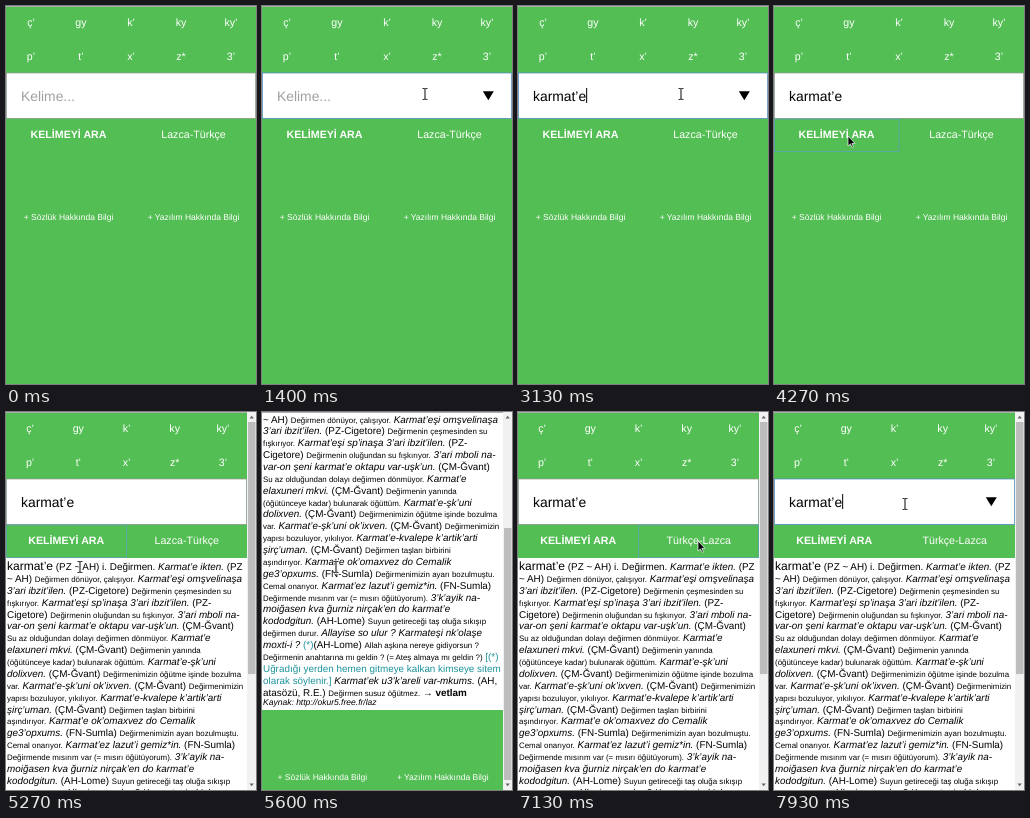
Animation, 250 px wide and 378 px high, one loop 8 s. Source, as an HTML page:

```html
<!DOCTYPE html>
<html lang="tr">
<head>
<meta charset="utf-8">
<title>Lazca sözlük</title>
<style>
html, body { margin: 0; width: 100%; height: 100%; overflow: hidden; background: #53be53; }
svg { display: block; width: 100%; height: 100%; }
text { font-family: "Liberation Sans", Arial, sans-serif; font-size: 10.67px; fill: #fff; text-rendering: geometricPrecision; white-space: pre; }
.mid { text-anchor: middle; }
.link { font-size: 8.53px; }
.strong { font-weight: bold; }
#value { font-size: 13.87px; }
#results text { font-size: 9.9px; fill: #000; }
#results .small { font-size: 7.92px; }
#results .head { font-size: 12px; }
#results .source { font-size: 8.53px; font-style: italic; }
.ital { font-style: italic; }
.note { fill: #1c929c; }
#list text { font-family: "DejaVu Sans", sans-serif; font-size: 8.53px; fill: #000; }
</style>
</head>
<body>
<svg id="stage" viewBox="0 0 250 378" preserveAspectRatio="none">
  <rect width="250" height="378" fill="#53be53"/>
  <g id="page">
    <g id="keys"></g>
    <rect id="field" x=".33" y="67" height="45.33" fill="#fff" stroke-width=".67"/>
    <text id="value" x="15" y="94.5"></text>
    <rect id="caret" y="82" width="1" height="15"/>
    <path id="drop" d="M-5.5-4.5h11L0 4.5z"/>
    <rect id="focus" y="113" height="32.67" fill="none" stroke="#5b9fc4" stroke-width=".67"/>
    <text id="search" class="mid strong" y="132.4">KELİMEYİ ARA</text>
    <text id="mode" class="mid" y="132.4"></text>
    <g id="results"><rect y="146" width="241" height="311.5" fill="#fff"/></g>
    <text id="about" class="mid link">+ Sözlük Hakkında Bilgi</text>
    <text id="soft" class="mid link">+ Yazılım Hakkında Bilgi</text>
    <g id="list"></g>
  </g>
  <rect width="250" height="1" fill="#aab0aa"/>
  <g id="bar">
    <rect x="241" width="9" height="378" fill="#f1f1f1"/>
    <rect id="thumb" x="242" width="7.5" height="252" fill="#bdbdbd"/>
    <path d="M243.5 6.5l2.2-2.8 2.2 2.8zM243.5 371.5l2.2 2.8 2.2-2.8z" fill="#666"/>
  </g>
  <g id="pointer">
    <g id="beam" fill="none">
      <g stroke="#fff" stroke-width="2.4">
        <path id="beamLine" d="M-2.5-5.5H-1L0-4.7 1-5.5H2.5M0-4.7V4.7M-2.5 5.5H-1L0 4.7 1 5.5H2.5"/>
      </g>
      <use href="#beamLine" stroke="#333" stroke-width="1.2"/>
    </g>
    <path id="arrow" d="M0 0V10L2.4 7.9 4 11.4 5.4 10.8 3.9 7.4H7Z" stroke="#fff" stroke-width=".7"/>
  </g>
</svg>
<script>
const LOOP = 8000, BAR = 9, MAX_SCROLL = 159.5, ROW = 15.8;
const FOCUS = 670, PICK = 2800, SEARCH = 4270, SHOW = 4330, SWAP = 7000, REFOCUS = 7650;
const $ = id => document.getElementById(id);

function add(parent, tag, attrs, html = '') {
  const el = document.createElementNS('http://www.w3.org/2000/svg', tag);
  set(el, attrs);
  el.innerHTML = html;
  parent.append(el);
  return el;
}
function set(el, attrs) {
  for (const k in attrs) el.setAttribute(k, attrs[k]);
}
function show(el, on) {
  el.style.display = on ? '' : 'none';
}

const keys = ['ç’', 'gy', 'k’', 'ky', 'ky’', 'p’', 't’', 'x’', 'z*', '3’'].map((s, i) =>
  add($('keys'), 'text', { class: 'mid', y: i < 5 ? 20.4 : 53.7 }, s));

const words = ['ka', 'kabğa', 'kaçxa', 'kafri', 'kala', 'kalati', 'kama', 'kana', 'kapça', 'kapula',
  'kara', 'karmat’e', 'karpuzi', 'kartpost’ali', 'kart’ali', 'kata', 'kavi', 'kele', 'keremuli'];

// Markup: |small| {italic} #note# ^bold^ @head@
const marks = { '|': 'small', '{': 'ital', '#': 'note', '^': 'strong', '@': 'head' };
const entry = `@karmat’e@ (PZ ~ AH) i. Değirmen. {Karmat’e ikten.} (PZ
~ AH) |Değirmen dönüyor, çalışıyor.| {Karmat’eşi omşvelinaşa}
{3’ari ibzit’ilen.} (PZ-Cigetore) |Değirmenin çeşmesinden su|
|fışkırıyor.| {Karmat’eşi sp’inaşa 3’ari ibzit’ilen.} (PZ-
Cigetore) |Değirmenin oluğundan su fışkırıyor.| {3’ari mboli na-}
{var-on şeni karmat’e oktapu var-uşk’un.} (ÇM-Ğvant)
|Su az olduğundan dolayı değirmen dönmüyor.| {Karmat’e}
{elaxuneri mkvi.} (ÇM-Ğvant) |Değirmenin yanında|
|(öğütünceye kadar) bulunarak öğüttüm.| {Karmat’e-şk’uni}
{dolixven.} (ÇM-Ğvant) |Değirmenimizin öğütme işinde bozulma|
|var.| {Karmat’e-şk’uni ok’ixven.} (ÇM-Ğvant) |Değirmenimizin|
|yapısı bozuluyor, yıkılıyor.| {Karmat’e-kvalepe k’artik’arti}
{şirç’uman.} (ÇM-Ğvant) |Değirmen taşları birbirini|
|aşındırıyor.| {Karmat’e ok’omaxvez do Cemalik}
{ge3’opxums.} (FN-Sumla) |Değirmenimizin ayarı bozulmuştu.|
|Cemal onarıyor.| {Karmat’ez lazut’i gemiz*in.} (FN-Sumla)
|Değirmende mısırım var (= mısırı öğütüyorum).| {3’k’ayik na-}
{moiğasen kva ğurniz nirçak’en do karmat’e}
{kododgitun.} (AH-Lome) |Suyun getireceği taş oluğa sıkışıp|
|değirmen durur.| {Allayise so ulur ? Karmateşi nk’olaşe}
{moxti-i ?} #(*)#(AH-Lome) |Allah aşkına nereye gidiyorsun ?|
|Değirmenin anahtarına mı geldin ? (= Ateş almaya mı geldin ?)| #[(*)#
#Uğradığı yerden hemen gitmeye kalkan kimseye sitem#
#olarak söylenir.]# {Karmat’ek u3’k’areli var-mkums.} (AH,
atasözü, R.E.) |Değirmen susuz öğütmez.| → ^vetlam^`;

entry.split('\n').forEach((line, i) => {
  const html = line.replace(/([|{#^@])(.*?)[|}#^@]/g, (m, c, s) => `<tspan class="${marks[c]}">${s}</tspan>`);
  add($('results'), 'text', { x: 1, y: i ? 170 + (i - 1) * 11.87 : 157.5 }, html);
});
add($('results'), 'text', { x: 1, y: 452.5, class: 'source' }, 'Kaynak: http://okur5.free.fr/laz');

// Keyframes are [time, ...values], eased between neighbours.
const smooth = u => u * u * (3 - 2 * u);
const linear = u => u;
function track(frames, t, ease) {
  let i = frames.findIndex(f => f[0] > t);
  if (i < 0) i = frames.length;
  if (i === 0 || i === frames.length) return frames[Math.max(0, i - 1)].slice(1);
  const a = frames[i - 1], b = frames[i], u = ease((t - a[0]) / (b[0] - a[0]));
  return a.slice(1).map((v, k) => v + (b[k + 1] - v) * u);
}
const pointerPath = [[150, 260, 150], [600, 163, 88], [3400, 163, 88], [4150, 74, 130], [4670, 74, 130],
  [5050, 74, 155], [6200, 74, 155], [6400, 76, 157], [6540, 76, 157], [6930, 180, 129], [7270, 180, 129], [7600, 131, 92]];
const scrollPath = [[5290, 0], [5580, MAX_SCROLL], [5930, MAX_SCROLL], [6470, 19.5], [6560, 0]];

const typed = t => t < 1670 ? '' : t < 1800 ? 'k' : t < 1930 ? 'ka' : t < PICK ? 'kar' : 'karmat’e';

let shownList = '';
function drawList(query, picked) {
  if (shownList === query + picked) return;
  shownList = query + picked;
  const list = $('list');
  list.innerHTML = '';
  if (!query) return;
  const hits = words.filter(w => w.startsWith(query)).slice(0, 17);
  add(list, 'rect', { x: 0, y: 113, width: 250, height: hits.length * ROW + .5, fill: '#fff', stroke: '#b4b4b4', 'stroke-width': .7 });
  hits.forEach((w, i) => {
    const y = 113.3 + i * ROW, on = i === picked;
    if (on) add(list, 'rect', { x: 0, y, width: 250, height: ROW, fill: '#4a8fd8' });
    add(list, 'text', { x: 2.5, y: y + 10.8, style: on ? 'fill:#fff' : '' }, w);
  });
}

function draw(t) {
  const found = t >= SHOW, w = found ? 250 - BAR : 250;
  const [scroll] = track(scrollPath, t, linear);
  const [px, py] = track(pointerPath, t, smooth);
  const pageY = py + scroll;

  $('page').setAttribute('transform', `translate(0 ${-scroll})`);
  keys.forEach((k, i) => k.setAttribute('x', w * (i % 5 + .5) / 5));
  for (const id of ['search', 'about']) $(id).setAttribute('x', w / 4);
  for (const id of ['mode', 'soft']) $(id).setAttribute('x', w * .75);
  for (const id of ['about', 'soft']) $(id).setAttribute('y', found ? 527.5 : 213.8);
  $('mode').textContent = t < SWAP ? 'Lazca-Türkçe' : 'Türkçe-Lazca';

  const focused = t >= FOCUS && t < SEARCH || t >= REFOCUS;
  const overField = px < w && pageY > 67 && pageY < 113;
  set($('field'), { width: w - .67, stroke: focused ? '#4f7fd0' : '#8f8f8f' });
  const value = typed(t);
  $('value').textContent = value || 'Kelime...';
  $('value').style.fill = value ? '#000' : '#a0a0a0';
  const since = t - [REFOCUS, PICK, 1930, 1800, 1670, FOCUS].find(s => s <= t);
  show($('caret'), focused && since % 1060 < 530);
  $('caret').setAttribute('x', 15 + (value ? $('value').getComputedTextLength() : 0));
  show($('drop'), focused || overField);
  $('drop').setAttribute('transform', `translate(${w - 23.7} 89.7)`);

  show($('focus'), t >= SEARCH && t < REFOCUS);
  set($('focus'), { x: t < SWAP ? .33 : w / 2, width: w / 2 - .33 });
  show($('results'), found);
  show($('bar'), found);
  $('thumb').setAttribute('y', 10 + scroll / MAX_SCROLL * 106);
  drawList(t < PICK ? value : '', t < 2270 ? -1 : t < 2530 ? 0 : 1);

  const beam = overField || found && pageY > 146;
  show($('beam'), beam);
  show($('arrow'), !beam);
  $('pointer').setAttribute('transform', `translate(${px} ${py})`);
}

const start = performance.now();
function tick() {
  draw((performance.now() - start) % LOOP);
  requestAnimationFrame(tick);
}
tick();
</script>
</body>
</html>
```
